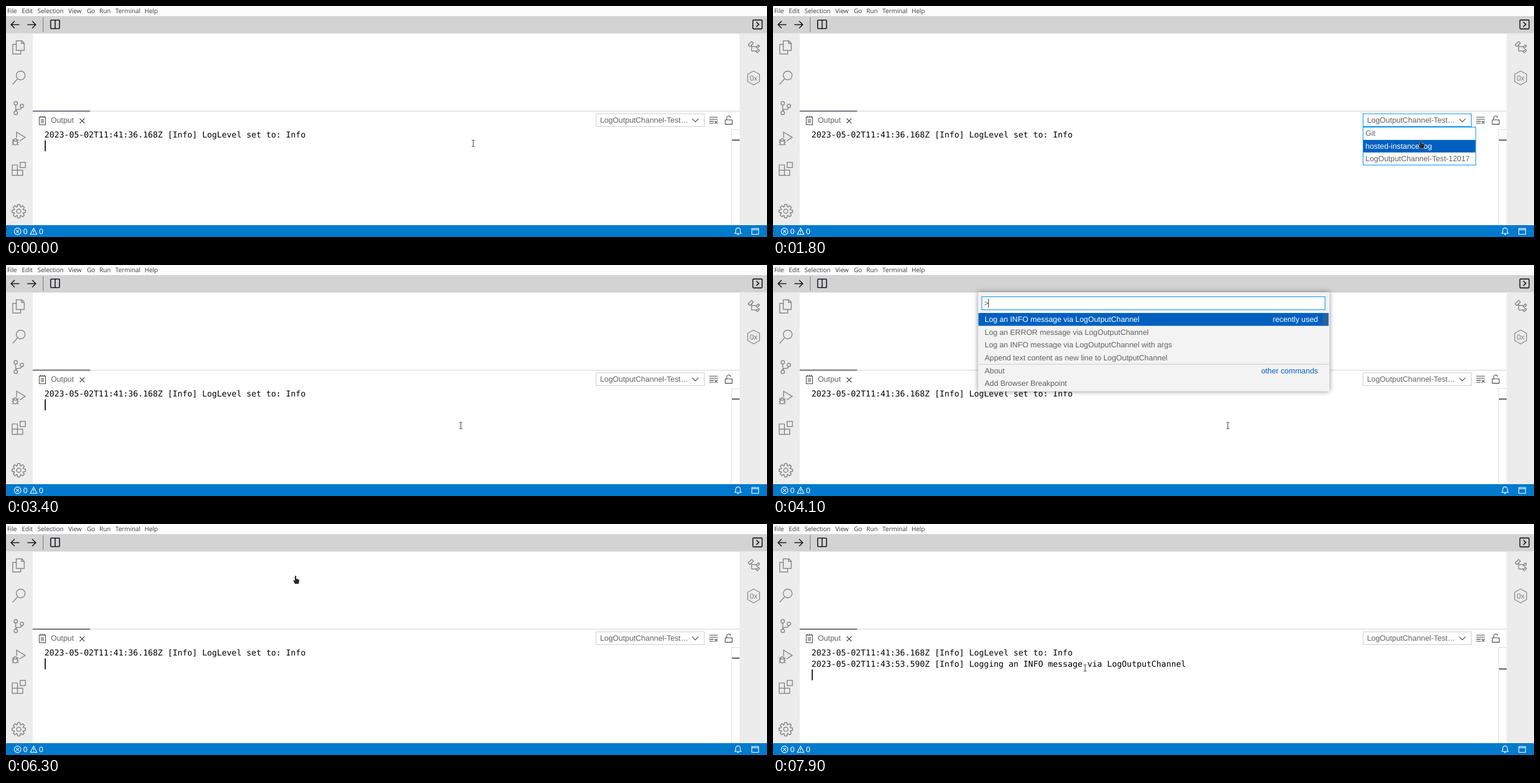
An HTML page that plays this animation: 1280 by 390 pixels, repeating every 8000 ms.

```html
<!DOCTYPE html>
<html lang="en">
<head>
<meta charset="utf-8">
<title>Log output channel</title>
<style>
  html, body { margin: 0; width: 100%; height: 100%; overflow: hidden; background: #fff; }
  svg { display: block; }
  text { font: 12.83px "Liberation Sans", Arial, sans-serif; fill: #616161; text-rendering: geometricPrecision; white-space: pre; }
  .menu text { font: 10.4px "Open Sans", "Noto Sans", sans-serif; fill: #3a3a3a; }
  .log text { font: 13.77px "DejaVu Sans Mono", monospace; fill: #000; }
  .line { fill: none; stroke-width: 1.4; }
  .side { stroke: #868686; stroke-width: 1.5; }
  .bar { stroke: #16161d; stroke-width: 1.6; }
  .tool { stroke: #424242; stroke-width: 1.1; }
  .status { stroke: #fff; stroke-width: 1.1; }
  .status text, text.on { fill: #fff; }
  .status text { stroke: none; }
  text.link { fill: #0060c0; }
  .end { text-anchor: end; }
  .select { fill: #0060c0; }
  .focus { fill: #fff; stroke: #0090f1; }
  .pointer { fill: #2c2c2c; stroke: #fff; stroke-width: .7; paint-order: stroke; }
  #popup { filter: drop-shadow(0 0 4px rgba(0, 0, 0, .45)); }
</style>
</head>
<body>
<svg width="1280" height="390" viewBox="0 0 1280 390">
  <rect width="1280" height="390" fill="#fff"/>
  <rect width="1280" height="17" fill="#fcfcfc"/>
  <rect y="17" width="1280" height="29.5" fill="#d3d3d3"/>
  <rect y="46.5" width="45" height="324" fill="#ececec"/>
  <rect x="1234" y="46.5" width="46" height="324" fill="#ececec"/>
  <rect y="370" width="1280" height="20" fill="#007acc"/>

  <g class="menu">
    <text x="2" y="12.4">File</text><text x="26.5" y="12.4">Edit</text>
    <text x="53" y="12.4">Selection</text><text x="104.7" y="12.4">View</text>
    <text x="136" y="12.4">Go</text><text x="157" y="12.4">Run</text>
    <text x="184" y="12.4">Terminal</text><text x="233" y="12.4">Help</text>
  </g>

  <g class="line bar">
    <path d="M22.5 31.5H8.5M14.5 25.5L8.5 31.5L14.5 37.5M36 31.5H50M44 25.5L50 31.5L44 37.5"/>
    <path d="M62.5 19V43.5" stroke="#777" stroke-width="1"/>
    <rect x="75.2" y="23.7" width="14.8" height="14.6" rx="1"/><path d="M82.6 24V38"/>
    <rect x="1256.3" y="23.6" width="15.4" height="15" rx="1"/><path d="M1262 27L1266.3 31.1L1262 35.2"/>
  </g>

  <!-- activity bar, icons on a 24 unit grid -->
  <g class="line side">
    <g transform="translate(9.7 58) scale(.985)">
      <path d="M7.75 .75H17.2L21.25 4.8V17.25H7.75ZM16.75 .75V5.25H21.25M7 6.75H1.75V23.25H15.25V18"/>
    </g>
    <g transform="translate(9.7 109.2) scale(.985)">
      <circle cx="15.25" cy="8.25" r="7.5"/><path d="M9.6 14.3L1.55 23.4"/>
    </g>
    <g transform="translate(9.7 160.5) scale(.985)">
      <circle cx="6.8" cy="3.74" r="3"/><circle cx="17.27" cy="8.22" r="3"/><circle cx="6.8" cy="20.18" r="3"/>
      <path d="M6.8 7V17M16.9 11.2C16.3 13 15 14.2 13.5 14.2H10.5C8.5 14.2 7.2 15.5 6.8 17"/>
    </g>
    <g transform="translate(9.7 211.7) scale(.985)">
      <path d="M8.25 11V1.3L22.9 10.2L13.5 16.5"/>
      <path d="M2.25 16.5H9.75V19.4A3.75 3.85 0 0 1 2.25 19.4ZM3 16.2A3 3.4 0 0 1 9 16.2"/>
      <path d="M.5 14L3 16.5M11.5 14L9 16.5M0 18.75H2.25M9.75 18.75H12M.5 23.5L2.8 21.2M11.5 23.5L9.2 21.2"/>
    </g>
    <g transform="translate(9.7 263.2) scale(.985)">
      <path d="M14.25 .75H23.25V9.75H14.25ZM.75 5.25H9.75V14.25H18.75V23.25H.75ZM.75 14.25H9.75V23.25" stroke-linejoin="round"/>
    </g>
    <path id="gear"/><circle cx="21.5" cy="346.5" r="3.6"/>
    <path d="M1257.5 109.7L1267.5 115.3V127.5L1257.5 133.2L1247.5 127.5V115.3Z" stroke-linejoin="round" stroke-width="1.3"/>
    <path transform="translate(1246.3 57.7) scale(1.477)" fill="#868686" fill-rule="evenodd" stroke="none"
      d="M11.34 9.71H12.05L14.72 7.04V6.33L13.38 5H12.68L10.86 6.81H5.86V5.56L7.72 3.71V3L5.72 1H5L1 5V5.71L3 7.71H3.71L4.85 6.56V12.35L5.35 12.85H10V13.37L11.33 14.71H12.04L14.71 12.04V11.33L13.37 10H12.67L10.81 11.85H5.81V7.85H10V8.33ZM13.03 6.06L13.66 6.69L11.66 8.69L11.03 8.06ZM13.03 11.06L13.66 11.69L11.66 13.69L11.03 13.06ZM3.35 6.65L2.06 5.35L5.35 2.06L6.65 3.35Z"/>
  </g>
  <text x="1257.5" y="126.2" text-anchor="middle" style="font-size:12.5px;fill:#808080">0x</text>

  <!-- panel -->
  <path d="M45 177.5H1234" stroke="#d2d2d2"/>
  <path d="M45 177.6H141.5" stroke="#424250" stroke-width="1.5"/>
  <g class="line tool">
    <path d="M56 187.5H66.5V200.5H56ZM58 185.5V188.5M61.2 185.5V188.5M64.4 185.5V188.5M58.5 191.8H64M58.5 194.4H64M58.5 197H64"/>
    <path d="M124 190L132 198M132 190L124 198"/>
    <path d="M1183 187.8H1197M1183 191.2H1197M1183 194.6H1190.5M1183 198H1190.5M1192 194L1196.7 198.7M1196.7 194L1192 198.7"/>
    <path d="M1209.8 192.2H1221.4V199.6H1209.8ZM1212.3 192V189.2A3.3 3.3 0 0 1 1218.9 188.8"/>
  </g>
  <text x="75.5" y="197">Output</text>
  <path d="M1220.5 208V370M1221 208.5H1234" stroke="#dedede"/>
  <rect id="mark" x="1221" width="13" height="1.6" fill="#333"/>
  <g class="log">
    <text x="64.7" y="221.9">2023-05-02T11:41:36.168Z [Info] LogLevel set to: Info</text>
    <text id="entry" x="64.7" y="240.6">2023-05-02T11:43:53.590Z [Info] Logging an INFO message via LogOutputChannel</text>
  </g>
  <rect id="caret" x="65.1" width="1.7" height="18.5"/>

  <!-- channel selector -->
  <rect id="field" x="992.5" y="182" width="182" height="21.5" fill="#fff" stroke="#cecece"/>
  <text x="999.2" y="197">LogOutputChannel-Test…</text>
  <path class="line tool" d="M1154.2 190.3L1159.4 195.6L1164.6 190.3"/>
  <g id="list">
    <rect class="focus" x="992.5" y="204.5" width="189.5" height="64"/>
    <rect id="choice" class="select" x="993" width="188.6" height="21.2"/>
    <text x="996.5" y="219">Git</text>
    <text x="996.5" y="241">hosted-instance-log</text>
    <text x="996.5" y="262.2">LogOutputChannel-Test-12017</text>
  </g>

  <!-- command palette -->
  <g id="palette">
    <rect id="popup" x="345" y="46" width="591" height="167.3" fill="#f3f3f3"/>
    <rect class="focus" x="351.2" y="53.6" width="577.3" height="22"/>
    <text x="355" y="69">&gt;</text>
    <rect id="prompt" x="362" y="57" width="1" height="15" fill="#333"/>
    <rect id="hover" x="345.5" width="589" height="21.67" fill="#e8e8e8"/>
    <rect class="select" x="345.5" y="81" width="589" height="21.67"/>
    <rect id="slider" x="925" y="81" width="9.3" height="21.67" fill="#646464" opacity=".4"/>
    <path d="M345.5 167.6H935.5" stroke="#ccc"/>
    <text class="on" x="356" y="95.8">Log an INFO message via LogOutputChannel</text>
    <text class="on end" x="916.7" y="95.8">recently used</text>
    <text x="356" y="117.8">Log an ERROR message via LogOutputChannel</text>
    <text x="356" y="139">Log an INFO message via LogOutputChannel with args</text>
    <text x="356" y="160.8">Append text content as new line to LogOutputChannel</text>
    <text x="356" y="183.4">About</text>
    <text class="link end" x="916.7" y="183.4">other commands</text>
    <text x="356" y="204">Add Browser Breakpoint</text>
  </g>

  <g class="line status">
    <circle cx="19.5" cy="380.5" r="5.6"/><path d="M17.2 378.2L21.8 382.8M21.8 378.2L17.2 382.8"/>
    <text x="29" y="385">0</text>
    <path d="M46.5 375L52 385.5H41ZM46.5 378.5V382M46.5 383V384.3"/>
    <text x="55.5" y="385">0</text>
    <path d="M1226 384H1236.5L1235.2 381.5V378.5A3.9 3.9 0 0 0 1227.4 378.5V381.5ZM1229.8 385.2Q1231.3 387 1232.8 385.2"/>
    <path d="M1254.5 375.5H1265.8V385.5H1254.5ZM1254.5 377.6H1265.8"/>
  </g>

  <g id="cursor">
    <path id="arrow" class="pointer" d="M0 0V11L2.5 8.8L4.3 12.8L6 12L4.3 8.3H7.3Z"/>
    <path id="hand" class="pointer" d="M-1.2 1.2Q0 -.6 1.2 1.2V5.6L5 6.6Q6.6 7.2 6.2 9.6L5.2 14H-1L-3.7 9Q-3.8 7.2 -2.2 8L-1.2 9Z"/>
    <path id="beam" class="line" stroke="#6c6c6c" stroke-width="1" d="M-2.5 -5.4H-.8L0 -4.8L.8 -5.4H2.5M0 -5V5M-2.5 5.4H-.8L0 4.8L.8 5.4H2.5"/>
  </g>
</svg>
<script>
  const LOOP = 8000, STEP = 100;
  const $ = id => document.getElementById(id);
  const show = (id, on) => { $(id).style.display = on ? '' : 'none'; };
  const within = (v, a, b) => v >= a && v < b;

  // cursor hotspot: time, x, y
  const path = [
    [0, 786, 232], [200, 786, 232], [400, 800, 237], [600, 940, 222], [800, 1070, 203],
    [900, 1106, 195], [1000, 1113, 194], [1200, 1113, 194], [1500, 1104, 194],
    [1600, 1101, 200], [2000, 1078, 253], [2200, 1055, 255], [2400, 1075, 253],
    [2600, 1075, 253], [2700, 900, 262], [2800, 770, 269], [3100, 770, 269],
    [3400, 765, 271], [4400, 765, 271], [4600, 755, 266], [4800, 660, 205],
    [5000, 545, 118], [5200, 501, 95], [5300, 493, 88], [5500, 487, 87],
    [6300, 487, 87], [6400, 487, 88], [7000, 487, 88], [7100, 485, 92],
    [7300, 497, 150], [7500, 529, 257], [7600, 525, 248], [7800, 525, 248], [7900, 525, 243]
  ];

  function place(t) {
    const i = path.findIndex(p => p[0] >= t);
    if (i <= 0) return path[i ? path.length - 1 : 0].slice(1);
    const [t0, x0, y0] = path[i - 1], [t1, x1, y1] = path[i];
    const k = (t - t0) / (t1 - t0);
    return [x0 + (x1 - x0) * k, y0 + (y1 - y0) * k];
  }

  function cursorKind(t, x, y, listOpen, paletteOpen) {
    if (within(t, 5000, 6400)) return 'hand';
    if (paletteOpen && within(x, 345, 936) && within(y, 46, 213)) return y > 80 ? 'hand' : 'beam';
    if (within(x, 992, 1182) && within(y, 182, listOpen ? 269 : 204)) return 'hand';
    return y > 208 ? 'beam' : 'arrow';
  }

  function draw(t) {
    const [x, y] = place(t);
    const listOpen = within(t, 1200, 3000);
    const paletteOpen = within(t, 4100, 6300);
    const logged = t >= 6500;

    const kind = cursorKind(t, x, y, listOpen, paletteOpen);
    for (const id of ['arrow', 'hand', 'beam']) show(id, id === kind);
    $('cursor').setAttribute('transform', `translate(${x} ${y})`);

    show('list', listOpen);
    $('field').setAttribute('stroke', listOpen ? '#0090f1' : '#cecece');
    const overList = x > 992 && within(y, 205, 268);
    const row = overList ? Math.min(2, Math.floor((y - 205) / 21.2)) : 2;
    $('choice').setAttribute('y', 204.9 + row * 21.2);
    [...$('list').querySelectorAll('text')].forEach((el, i) => el.classList.toggle('on', i === row));

    show('palette', paletteOpen);
    show('prompt', t < 4800 || within(t, 5300, 5900));
    show('slider', t < 4600 || t >= 4900);
    const line = Math.floor((y - 81) / 21.67);
    show('hover', kind === 'hand' && line > 0 && line < 6);
    $('hover').setAttribute('y', 81 + line * 21.67);

    show('entry', logged);
    show('caret', !listOpen && !paletteOpen);
    $('caret').setAttribute('y', logged ? 245.4 : 226.8);
    $('mark').setAttribute('y', logged ? 243.9 : 225.6);
  }

  // eight teeth: two corners and a valley each
  const corners = Array.from({ length: 24 }, (_, i) => {
    const r = [11.4, 11.4, 7.8][i % 3];
    const a = Math.floor(i / 3) * Math.PI / 4 + [-.16, .16, Math.PI / 8][i % 3];
    return `${21.5 + r * Math.cos(a)} ${346.5 + r * Math.sin(a)}`;
  });
  $('gear').setAttribute('d', `M${corners.join('L')}Z`);

  const start = performance.now();
  function tick() {
    const t = (performance.now() - start) % LOOP;
    draw(Math.floor(t / STEP) * STEP);
    requestAnimationFrame(tick);
  }
  tick();
</script>
</body>
</html>
```
